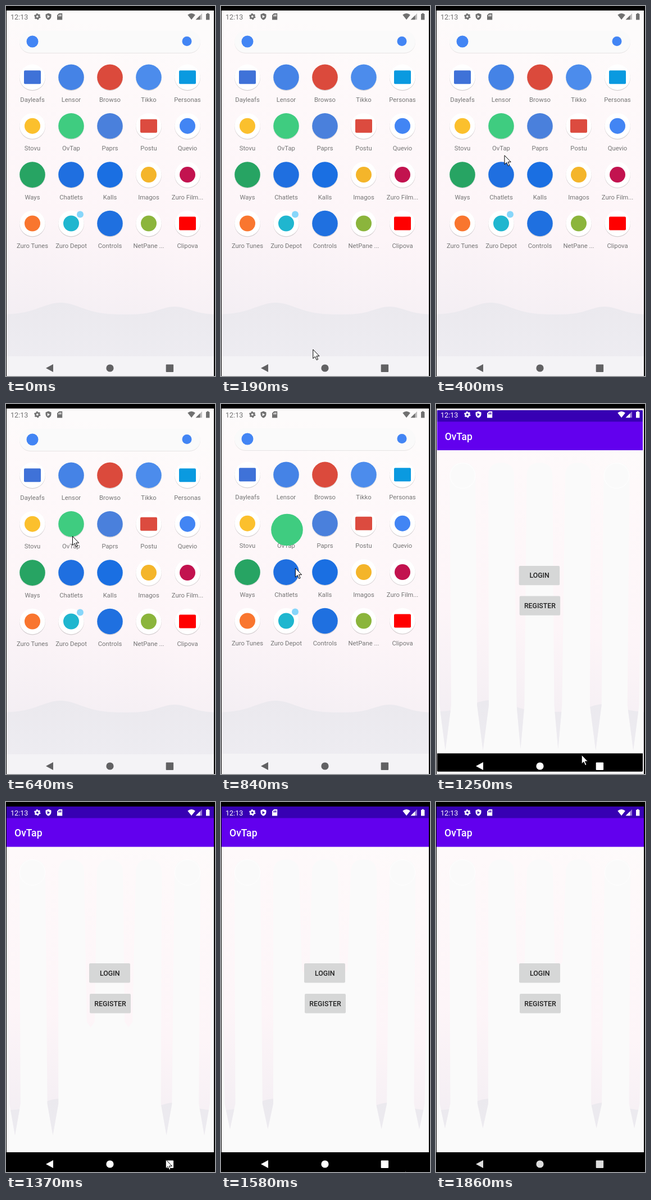
An HTML page for the animation above (1900 ms loop, 372 by 656 pixels).

```html
<!DOCTYPE html>
<html lang="en">
<head>
<meta charset="utf-8">
<style>
  html, body { margin: 0; width: 372px; height: 656px; overflow: hidden; background: #000; }
  svg { display: block; }
  text { font-family: Roboto, Arial, sans-serif; }
  .label { font-size: 11.3px; fill: #757575; text-anchor: middle; }
  .button { font-size: 12.4px; font-weight: 500; fill: #222; text-anchor: middle; }
</style>
</head>
<body>
<svg width="372" height="656" viewBox="0 0 372 656">
  <defs>
    <linearGradient id="sky" x1="0.1" y1="0" x2="0" y2="1">
      <stop offset="0" stop-color="#fdfbfb"/>
      <stop offset=".12" stop-color="#fef9fa"/>
      <stop offset=".55" stop-color="#fdf5f8"/>
      <stop offset=".85" stop-color="#f3eef3"/>
    </linearGradient>
    <linearGradient id="haze" x1="0" y1="0" x2="0" y2="1">
      <stop offset="0" stop-color="#ebe9ee"/>
      <stop offset="1" stop-color="#eeedf2"/>
    </linearGradient>
    <g id="wall">
      <rect x="1" y="8" width="369" height="648" fill="url(#sky)"/>
      <path id="hills" fill="url(#haze)"/>
    </g>
    <clipPath id="screen"><rect x="1" y="8" width="369" height="648"/></clipPath>
    <clipPath id="frame"><rect id="frameRect" x="1" y="8" width="369" height="648"/></clipPath>
    <clipPath id="gaps"><path id="gapPath"/></clipPath>
  </defs>

  <g clip-path="url(#screen)">
    <use href="#wall"/>
    <g id="desk">
      <rect x="1" y="621" width="369" height="40" fill="#f4f3f6"/>
      <rect x="24" y="45" width="322" height="39" rx="19.5" opacity=".09"/>
      <rect x="24" y="44" width="322" height="39" rx="19.5" fill="#fafafa"/>
      <circle cx="47" cy="63" r="10.5" fill="#4285f4"/>
      <circle cx="322" cy="62.5" r="8.5" fill="#4285f4"/>
      <g id="icons"></g>
      <circle cx="132" cy="369.5" r="6" fill="#87d6fa"/>
    </g>
    <circle id="bubble" fill="#3fcc80"/>

    <g id="app" clip-path="url(#frame)">
      <rect x="1" y="8" width="369" height="648" fill="#fafafa"/>
      <g clip-path="url(#gaps)"><use href="#wall"/></g>
      <g fill="none" stroke="#fff"><circle cx="47" cy="125" r="22.5"/><circle cx="323" cy="125" r="22.5"/></g>
      <rect x="1" y="8" width="369" height="71.5" fill="#6200ee"/>
      <rect x="1" y="8" width="369" height="20.5" fill="#3700b3"/>
      <rect x="1" y="621" width="369" height="40"/>
      <text x="15" y="61" font-size="17.6" font-weight="500" fill="#fff">OvTap</text>
      <g fill="#d6d7d7">
        <rect x="148" y="286" width="73" height="34.5" rx="2"/>
        <rect x="149" y="340" width="73" height="34.5" rx="2"/>
      </g>
      <text class="button" x="184.7" y="307.5">LOGIN</text>
      <text class="button" x="185.5" y="361.5">REGISTER</text>
    </g>
    <circle id="flash" fill="#3fcc80"/>

    <g id="status">
      <text x="8" y="23.5" font-size="12.6">12:13</text>
      <g fill="none" stroke="currentColor">
        <circle cx="55.8" cy="18.7" r="3.2" stroke-width="2.6"/>
        <circle cx="55.8" cy="18.7" r="4.9" stroke-width="1.7" stroke-dasharray="2.6 2.53"/>
        <path d="M93.8 16V18.5M95.8 15V18.5M97.8 15V18.5" stroke="none"/>
      </g>
      <path fill-rule="evenodd" d="M75.5 12.7L80.5 14.7V18.5Q80 23 75.5 24.8 71 23 70.5 18.5V14.7ZM73.7 16V21.4L78.2 18.7Z"/>
      <path fill-rule="evenodd" d="M94.3 13H100.2V24.4H91V16.3ZM93.2 16V18.5H94.4V16ZM95.2 15V18.5H96.4V15ZM97.2 15V18.5H98.4V15Z"/>
      <path d="M323.3 15.7Q330 10.4 336.9 15.7L330.1 24.2Z"/>
      <path d="M349 13V24.3H337.7Z" opacity=".45"/>
      <path d="M345.5 16.5V24.3H337.7Z"/>
      <path d="M357.7 12.8H360.7V14H362.4V24.4H356V14H357.7Z"/>
    </g>
    <g id="nav">
      <path d="M71 642L84 635V649Z"/>
      <circle cx="185" cy="642" r="6.6"/>
      <rect x="284.7" y="635.6" width="13.4" height="13.4" rx="1"/>
    </g>
  </g>
  <path id="pointer" d="M0 0V16L3.7 12.6 6.4 18.6 8.8 17.5 6.2 11.7H11.2Z" fill="#fff" stroke="#000"/>
</svg>

<script>
const $ = id => document.getElementById(id);
const set = (id, attrs) => { for (const k in attrs) $(id).setAttribute(k, attrs[k]); };
const clamp = v => Math.max(0, Math.min(1, v));
const mix = (a, b, k) => a + (b - a) * k;
const PITCH = 69;

// Two soft hills
const bump = (x, at, width, height) => height * Math.exp(-(((x - at) / width) ** 2));
let ridge = 'M0 656';
for (let x = 0; x <= 372; x += 4) ridge += `L${x} ${547 - bump(x, 97, 50, 21) - bump(x, 300, 38, 14)}`;
set('hills', { d: ridge + 'V656Z' });

// A disc fills its tile; a dot or box sits on a white one.
const marks = {
  disc: (x, y) => `<circle cx="${x}" cy="${y}" r="22.8"/>`,
  dot: (x, y) => `<circle cx="${x}" cy="${y}" r="14"/>`,
  box: (x, y) => `<rect x="${x - 15}" y="${y - 12}" width="30" height="24" rx="2"/>`
};
const icons = [
  ['Dayleafs', 'box', '#3f72d8'], ['Lensor', 'disc', '#4583e6'], ['Browso', 'disc', '#db4a3c'],
  ['Tikko', 'disc', '#4c8cec'], ['Personas', 'box', '#0a9ae0'],
  ['Stovu', 'dot', '#fbc02d'], ['OvTap', 'disc', '#3fcc80'], ['Paprs', 'disc', '#4a80dc'],
  ['Postu', 'box', '#dc4b3f'], ['Quevio', 'dot', '#4285f4'],
  ['Ways', 'disc', '#27a463'], ['Chatlets', 'disc', '#1f6fe0'], ['Kalls', 'disc', '#1a6fe2'],
  ['Imagos', 'dot', '#f4b52a'], ['Zuro Film...', 'dot', '#c2134f'],
  ['Zuro Tunes', 'dot', '#f9762f'], ['Zuro Depot', 'dot', '#1fb6cf'], ['Controls', 'disc', '#1f70e0'],
  ['NetPane ...', 'dot', '#8bb53c'], ['Clipova', 'box', '#f00']
];
$('icons').innerHTML = icons.map(([label, mark, color], i) => {
  const x = 47 + i % 5 * PITCH, y = 126.3 + Math.floor(i / 5) * 86.4;
  return `<g id="${label}"><circle cx="${x}" cy="${y + 1}" r="23" opacity=".16"/>
    <circle cx="${x}" cy="${y}" r="22.8" fill="#fff"/><g fill="${color}">${marks[mark](x, y)}</g></g>
    <text class="label" x="${x}" y="${y + 43.7}">${label}</text>`;
}).join('');

// Wallpaper strips stay between the columns; the two inner ones recede.
function gapShape(t) {
  const rest = Math.exp(-Math.max(0, t - 1250) / 110);
  let d = '';
  for (let i = 0; i < 6; i++) {
    const inner = i === 2 || i === 3;
    const left = i * PITCH - 22, right = left + PITCH, mid = 16 + 67.4 * i;
    const half = inner ? 7 : mix(9.5, 10.5, rest);
    const tip = mix(inner ? 292 : 578, 616, rest), base = Math.min(535, tip - 10);
    d += `M${left} 79H${right}V102q-23 0 -23 23L${mid + half} ${base}L${mid} ${tip}L${mid - half} ${base}L${left + 23} 125q0 -23 -23 -23Z`;
  }
  return d;
}

// Pointer stops: time, x, y
const stops = [[160, 170, 660], [400, 122, 265], [740, 117, 222], [840, 132, 290],
  [1120, 234, 573], [1250, 259, 622], [1590, 330, 655]];
function pointerAt(t) {
  const i = stops.findIndex(s => s[0] > t);
  if (i < 1) return [400, 700];
  const [t0, x0, y0] = stops[i - 1], [t1, x1, y1] = stops[i], k = (t - t0) / (t1 - t0);
  return [mix(x0, x1, k), mix(y0, y1, k)];
}

function draw(t) {
  const press = clamp((t - 740) / 80);
  const open = clamp((t - 1140) / 160), p = 1 - (1 - open) ** 4;
  const inApp = p > 0.9;

  set('desk', { transform: `translate(0 ${press ? -1 : 0})` });
  set('OvTap', { visibility: press ? 'hidden' : 'visible' });
  set('bubble', { cx: mix(116, 117.5, press), cy: mix(212.7, 223, press), r: press ? mix(22.8, 28.3, press) : 0 });

  // The window grows out of the pressed icon.
  const s = mix(0.15, 1, p);
  const dx = (1 - s) * 105, dy = (1 - s) * mix(228, 411, p);
  set('app', { visibility: open ? 'visible' : 'hidden', transform: `translate(${dx} ${dy}) scale(${s})` });
  set('frameRect', { height: mix(369, 648, p), rx: 184 * (1 - p) });
  set('flash', { cx: dx + 185.5 * s, cy: dy + 192.5 * s, r: 184.5 * s, opacity: open ? clamp(1 - open * 5) : 0 });
  set('gapPath', { d: gapShape(t) });

  const dim = 255 - 34 * clamp((t - 1580) / 280);
  const ink = inApp ? '#fff' : '#707070';
  set('status', { fill: ink, color: ink });
  set('nav', { fill: inApp ? `rgb(${dim},${dim},${dim})` : '#616163' });
  set('pointer', { transform: `translate(${pointerAt(t)})` });
}

const start = performance.now();
function tick() {
  draw((performance.now() - start) % 1900);
  requestAnimationFrame(tick);
}
tick();
</script>
</body>
</html>
```
